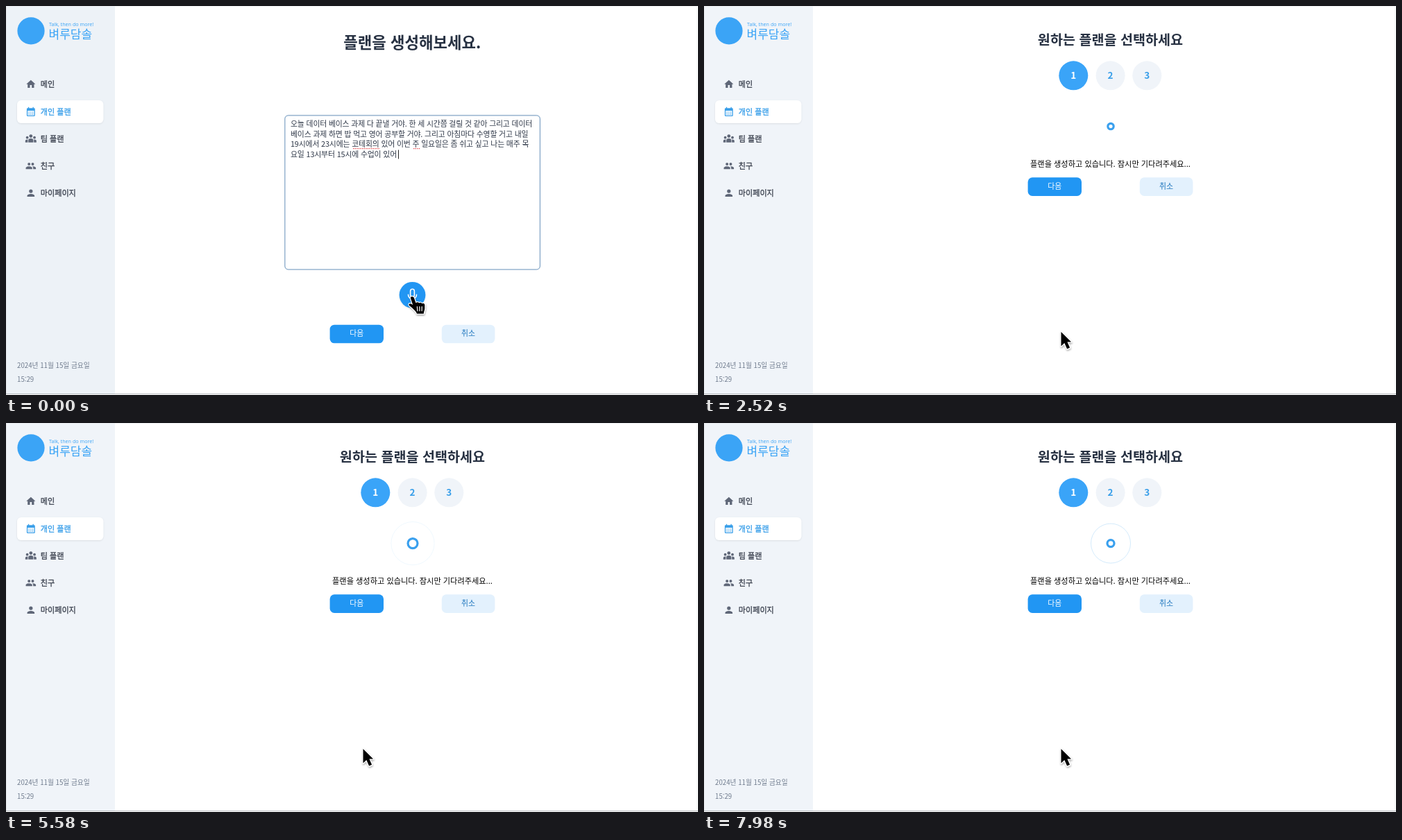
Animation of 997 by 561 pixels, one loop 8 s. Source, as an HTML page:

```html
<!DOCTYPE html>
<html lang="ko">
<head>
<meta charset="utf-8">
<title>플랜 생성</title>
<style>
html, body { margin: 0; width: 997px; height: 561px; overflow: hidden; background: #fff; }
svg { display: block; font-family: "Noto Sans CJK KR", "Noto Sans CJK", "Noto Sans", sans-serif; }
.mid { text-anchor: middle; }
.head { font-weight: 700; fill: #273142; text-anchor: middle; }
.nav text { font-size: 11.1px; fill: #3d4350; stroke: #3d4350; stroke-width: .3px; }
.nav path, .nav circle { fill: #5f6778; }
.nav .on text { fill: #3a9fe9; stroke: #3a9fe9; }
.nav .on path { fill: #3a9fe9; }
.memo { font-size: 10.9px; font-weight: 300; fill: #2f3848; letter-spacing: -.18px; }
.small { font-size: 9.7px; fill: #6f7b8d; }
.btn { font-size: 10.9px; text-anchor: middle; }
.num { font-size: 13.5px; font-weight: 700; fill: #3a9fe9; text-anchor: middle; }
</style>
</head>
<body>
<svg width="997" height="561" viewBox="0 0 997 561">
  <defs>
    <filter id="drop" x="-50%" y="-50%" width="200%" height="200%">
      <feDropShadow dx="0.5" dy="1.5" stdDeviation="1.2" flood-color="#000" flood-opacity=".35"/>
    </filter>
    <filter id="soft" x="-20%" y="-40%" width="140%" height="180%">
      <feDropShadow dx="0" dy="0.8" stdDeviation="0.8" flood-color="#000" flood-opacity=".1"/>
    </filter>
    <g id="buttons">
      <rect x="466.6" y="-13.3" width="77.4" height="26.6" rx="6.5" fill="#2196f3"/>
      <text class="btn" x="505.2" y="3.2" fill="#fff">다음</text>
      <rect x="627.8" y="-13.3" width="76.6" height="26.6" rx="6.5" fill="#e3f1fd"/>
      <text class="btn" x="666" y="3.2" fill="#1f76bd">취소</text>
    </g>
  </defs>

  <rect width="997" height="561" fill="#fff"/>
  <rect id="side" x="1" y="0" width="156" height="559"/>
  <rect x="0" y="0" width="997" height=".6" fill="#e4e6e9"/>
  <rect x="0" y="0" width="1" height="559" fill="#e4e7eb"/>
  <rect x="995.4" y="0" width=".8" height="559" fill="#eceef0"/>
  <rect x="0" y="559" width="997" height="1" fill="#b3b6ba"/>

  <circle cx="36" cy="35.8" r="19.6" fill="#3ba4f6"/>
  <text x="62" y="28.6" font-size="7.2" fill="#3ba4f6" style="font-family:'Open Sans',sans-serif">Talk, then do more!</text>
  <text x="61.6" y="46.8" font-size="17" font-weight="500" fill="#3ba4f6">벼루담솔</text>

  <g class="nav">
    <rect x="16" y="136" width="124.3" height="33" rx="6" fill="#fff" filter="url(#soft)"/>
    <g transform="translate(0 113)">
      <path transform="translate(27.9 -8.2) scale(.66)" d="M10 20v-6h4v6h5v-8h3L12 3 2 12h3v8z"/>
      <text x="49.8" y="4.3">메인</text>
    </g>
    <g class="on" transform="translate(0 152.5)">
      <path transform="translate(27.9 -8) scale(.66)" fill-rule="evenodd" d="M19 4h-1V2h-2v2H8V2H6v2H5q-2 0-2 2v14q0 2 2 2h14q2 0 2-2V6q0-2-2-2zM5 10h14v10H5zM7 12h2v2H7zM11 12h2v2h-2zM15 12h2v2h-2zM7 16h2v2H7zM11 16h2v2h-2zM15 16h2v2h-2z"/>
      <text x="49.8" y="4.3">개인 플랜</text>
    </g>
    <g transform="translate(0 191.6)">
      <circle cx="35.8" cy="-4" r="2.4"/><circle cx="30.6" cy="-1.9" r="1.9"/><circle cx="41" cy="-1.9" r="1.9"/>
      <path d="M32.2 5.2V2.2Q32.2-.6 35.8-.6T39.4 2.2V5.2zM31.4 5.2H27.8V3Q27.8.7 31.4.8zM40.2 5.2H43.8V3Q43.8.7 40.2.8z"/>
      <text x="49.8" y="4.3">팀 플랜</text>
    </g>
    <g transform="translate(0 230.7)">
      <g transform="translate(27.9 -8) scale(.66)">
        <circle cx="8" cy="8" r="3"/><circle cx="16" cy="8" r="3"/>
        <path d="M8 13c-2.3 0-7 1.2-7 3.5V19h14v-2.5C15 14.2 10.3 13 8 13zM16 13q-.5 0-1 .05c1.2.85 2 2 2 3.45V19h6v-2.5C23 14.2 18.3 13 16 13z"/>
      </g>
      <text x="49.8" y="4.3">친구</text>
    </g>
    <g transform="translate(0 269.8)">
      <g transform="translate(27.9 -8) scale(.66)">
        <circle cx="12" cy="8" r="4"/>
        <path d="M12 14c-2.7 0-8 1.3-8 4v2h16v-2c0-2.7-5.3-4-8-4z"/>
      </g>
      <text x="49.8" y="4.3">마이페이지</text>
    </g>
  </g>
  <text class="small" x="16" y="522">2024년 11월 15일 금요일</text>
  <text class="small" x="16" y="542.3">15:29</text>

  <g id="write">
    <text class="head" x="585.3" y="61" font-size="22.3">플랜을 생성해보세요.</text>
    <text id="ask" class="mid" x="585.5" y="118.5" font-size="16.85" fill="#465062">고정된 일정이 있나요?</text>
    <rect x="401.8" y="157.8" width="367.6" height="222.2" rx="5" fill="#fff" stroke="#e0eaf4" stroke-width="2.2"/>
    <rect x="401.8" y="157.8" width="367.6" height="222.2" rx="5" fill="none" stroke="#83a4c4" stroke-width="1"/>
    <g class="memo">
      <text x="410" y="174.3">오늘 데이터 베이스 과제 다 끝낼 거야. 한 세 시간쯤 걸릴 것 같아 그리고 데이터</text>
      <text x="410" y="188.7">베이스 과제 하면 밥 먹고 영어 공부할 거야. 그리고 아침마다 수영할 거고 내일</text>
      <text x="410" y="203.1">19시에서 23시에는 코테회의 있어 이번 주 일요일은 좀 쉬고 싶고 나는 매주 목</text>
      <text x="410" y="217.5">요일 13시부터 15시에 수업이 있어</text>
    </g>
    <path d="M500 205.6H539M587 205.6H597" stroke="#e5484d" stroke-width="1.2" stroke-dasharray="1.4 1.2"/>
    <rect id="caret" x="565" y="207.5" width="1" height="13" fill="#222"/>
    <circle cx="585.5" cy="416.8" r="18.9" fill="#2196f3" filter="url(#soft)"/>
    <g fill="none" stroke="#fff" stroke-width="1.6" stroke-linecap="round">
      <rect x="582.6" y="408.3" width="5.8" height="11.4" rx="2.9"/>
      <path d="M579.5 416.4a6 6 0 0 0 12 0M585.5 422.4v3"/>
    </g>
    <use href="#buttons" y="473"/>
  </g>

  <g id="pick">
    <text class="head" x="585.5" y="55.7" font-size="19.6">원하는 플랜을 선택하세요</text>
    <circle cx="532.3" cy="100.3" r="21" fill="#3aa4f8"/>
    <circle cx="585.6" cy="100.3" r="21" fill="#f0f4f9"/>
    <circle cx="638.3" cy="100.3" r="21" fill="#f0f4f9"/>
    <text class="num" x="532.3" y="105.2" style="fill:#fff">1</text>
    <text class="num" x="585.6" y="105.2">2</text>
    <text class="num" x="638.3" y="105.2">3</text>
    <g fill="none" stroke="#3aa0ee" transform="translate(586 173.6) scale(1.6)">
      <circle id="wave"/>
      <circle id="pulse" stroke-width="2"/>
    </g>
    <text class="mid" x="585.5" y="232.3" font-size="11.2" fill="#000">플랜을 생성하고 있습니다. 잠시만 기다려주세요...</text>
    <use href="#buttons" y="260.6"/>
  </g>

  <g id="cursor" filter="url(#drop)">
    <g id="hand">
      <path d="M-2.6 1C-3-1.8 1.5-2 2.5 1L5 8C6.5 6.5 9 7 9.5 8.4C11.3 7 13 7.5 13.8 9C16 8 17.7 9 17.8 11V16C17.8 19 16.3 20 16.3 23.5H6.5C5.500 20 2 17.500-.5 15C-3.500 12.500-5.800 11.500-4.800 9.800C-3.800 8.300-1 9.300 .7 11Z" fill="#000" stroke="#fff" stroke-width="2.4" stroke-linejoin="round" paint-order="stroke"/>
      <path d="M6.900 13.500l.4 6M10.300 13.500l.1 6M13.700 13.500l-.1 6" stroke="#fff" stroke-width="1.200" stroke-linecap="round"/>
    </g>
    <path id="arrow" d="M0 0V20.500L4.800 16L8.600 24.600L12.600 22.800L8.900 14.600H14.600Z" fill="#000" stroke="#fff" stroke-width="2.400" stroke-linejoin="round" paint-order="stroke"/>
  </g>
</svg>
<script>
const LOOP = 8000, SWITCH = 1935;
const PULSE_START = 1940, PULSE = 1336, WAVE_START = 3336, WAVE = 2672;
const el = id => document.getElementById(id);
const set = (id, attrs) => { for (const k in attrs) el(id).setAttribute(k, attrs[k]); };
const show = (id, on) => set(id, { display: on ? 'inline' : 'none' });
const lerp = (a, b, p) => a + (b - a) * p;
const ramp = (t, a, b) => Math.min(1, Math.max(0, (t - a) / (b - a)));
const ease = p => p * p * (3 - 2 * p);

// Cursor rests on the microphone, shifts a little, then goes to the next button.
function pointer(t) {
  const a = ease(ramp(t, 600, 930)), b = ease(ramp(t, 1090, 1620));
  return [lerp(lerp(585.5, 571.5, a), 514.5, b), lerp(lerp(420.2, 427.2, a), 470, b)];
}

function draw(t) {
  const next = t >= SWITCH;
  show('write', !next);
  show('pick', next);
  show('caret', t < 450);
  set('side', { fill: t < 1110 ? '#edf2f7' : '#f0f4f9' });
  set('ask', { opacity: ease(ramp(t, 450, 930)) });

  const [x, y] = pointer(t);
  const onMic = Math.hypot(x - 585.5, y - 416.8) < 19;
  const onNext = x > 467 && x < 544 && y > 459.7 && y < 486.3;
  const hand = !next && (onMic || onNext);
  set('cursor', { transform: `translate(${x} ${y})` });
  show('hand', hand);
  show('arrow', !hand);

  // The core shrinks 6 to 1 in a sixth of its cycle, then grows back.
  const s = Math.max(0, t - PULSE_START) / PULSE % 1 * 6;
  set('pulse', { r: s < 1 ? 6 - 5 * s : s });
  const w = Math.max(0, t - WAVE_START) / WAVE % 1;
  set('wave', {
    r: lerp(6, 22, w),
    'stroke-width': 2 * (1 - w),
    'stroke-opacity': t < WAVE_START ? 0 : 1 - w
  });
}

const start = performance.now();
function tick() {
  draw((performance.now() - start) % LOOP);
  requestAnimationFrame(tick);
}
draw(0);
requestAnimationFrame(tick);
</script>
</body>
</html>
```
